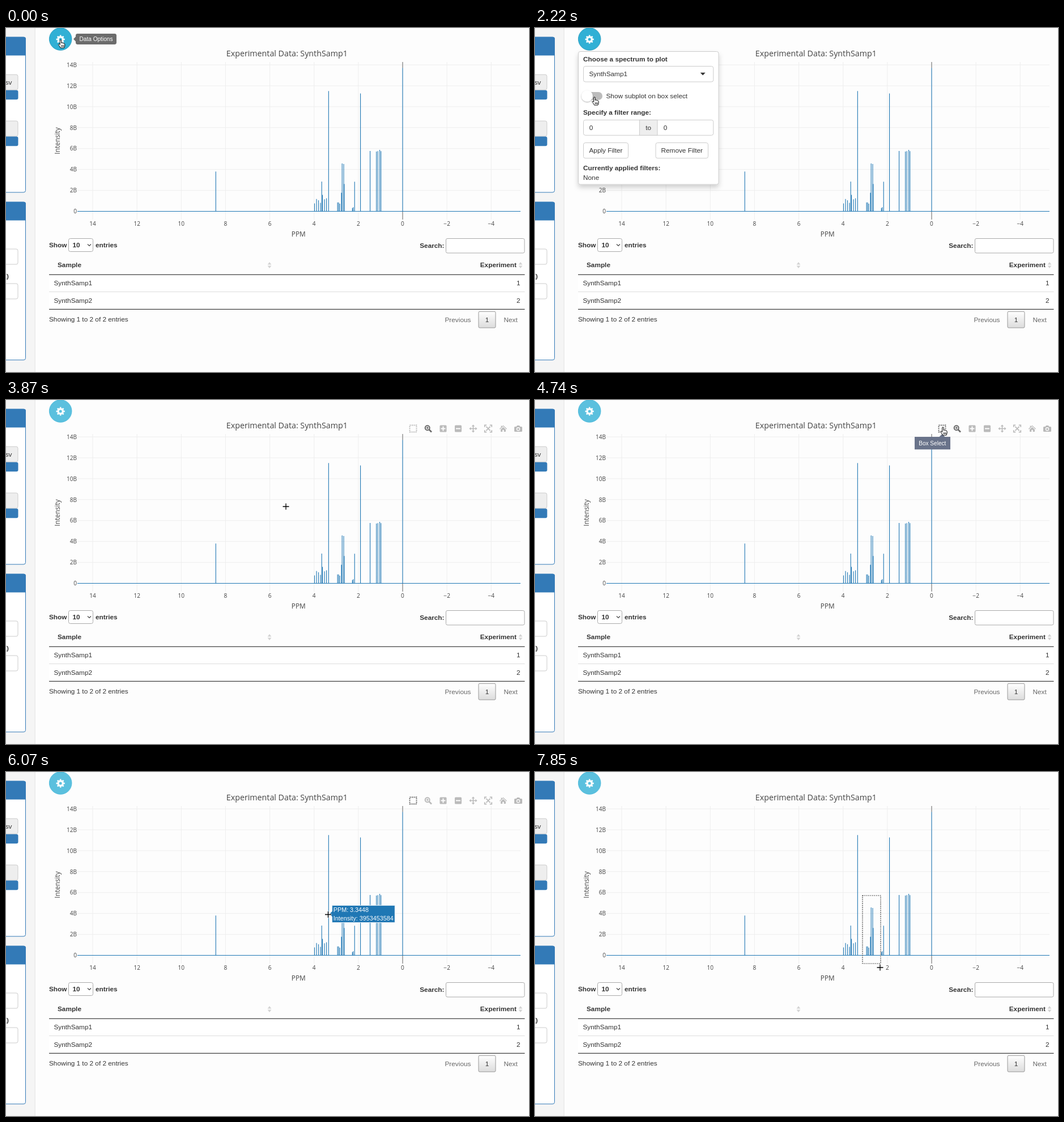
An HTML page for the animation above (8 s loop, 923 by 607 pixels).

```html
<!DOCTYPE html>
<html lang="en">
<head>
<meta charset="utf-8">
<title>Spectrum viewer</title>
<style>
  html, body { margin: 0; width: 100%; height: 100%; overflow: hidden; background: #fdfdfd; }
  svg { display: block; width: 923px; height: 607px; }
  text { font: 11.8px "Liberation Sans", Arial, sans-serif; fill: #333; white-space: pre; }
  .b { font-weight: 700; }
  .mid { text-anchor: middle; }
  .end { text-anchor: end; }
  .plot text { font-family: "Open Sans", sans-serif; fill: #444; }
  .plot .tick { font-size: 10.1px; }
  .plot .title { font-size: 14.25px; }
  .tip { font-size: 10.1px; fill: #fff; }
  .hov { font-size: 10.75px; fill: #fff; }
  .box { fill: #fff; stroke: #ccc; }
  .fill { fill: #337ab7; }
  .icon { fill: #444; stroke: #444; stroke-width: 0; }
  .line { fill: none; stroke-width: 1.8; }
</style>
</head>
<body>
<svg id="stage" viewBox="0 0 923 607" xmlns="http://www.w3.org/2000/svg">
  <defs>
    <linearGradient id="btn" x2="0" y2="1"><stop stop-color="#fff"/><stop offset="1" stop-color="#dcdcdc"/></linearGradient>
    <filter id="soft" x="-20%" y="-20%" width="140%" height="150%"><feDropShadow dx="0" dy="5" stdDeviation="4" flood-opacity=".18"/></filter>
    <filter id="lift" x="-40%" y="-40%" width="180%" height="180%"><feDropShadow dx="0" dy="1" stdDeviation="1" flood-opacity=".35"/></filter>
    <path id="sort" d="M0-5.5L3.4-.9H-3.4ZM0 5.5L3.4 .9H-3.4Z" fill="#d3d3d3"/>
  </defs>

  <g id="sidebar">
    <rect x="-5" y="-5" width="56.2" height="620" fill="#f5f5f5" stroke="#e3e3e3"/>
    <rect class="box" x="-9" y="16.2" width="43.5" height="273.8" rx="3.4" style="stroke:#337ab7"/>
    <path class="fill" d="M0 15.8H31.5Q35 15.8 35 19.3V48.5H0Z"/>
    <rect class="box" x="-9" y="82.2" width="30" height="27" rx="3" style="fill:#eee"/>
    <text class="end" x="10.5" y="100">data.csv</text>
    <rect class="fill" x="-9" y="109.7" width="30.5" height="16.6" rx="3"/>
    <rect class="box" x="-9" y="164" width="30" height="27" rx="3" style="fill:#eee"/>
    <rect class="fill" x="-9" y="191.5" width="30.5" height="16.8" rx="3"/>
    <rect class="box" x="-9" y="307.2" width="43.5" height="278.6" rx="3.4" style="stroke:#337ab7"/>
    <path class="fill" d="M0 306.8H31.5Q35 306.8 35 310.3V339.5H0Z"/>
    <rect class="box" x="-9" y="390" width="30" height="27" rx="3"/>
    <text class="b end" x="5" y="442">(K)</text>
    <rect class="box" x="-9" y="451" width="30" height="27" rx="3"/>
  </g>

  <g id="plot" class="plot"></g>

  <g id="table">
    <text class="b" x="76" y="387">Show</text>
    <rect class="box" x="110.5" y="371.5" width="43" height="23" rx="3" style="stroke:#aaa"/>
    <text class="b" x="117.5" y="387">10</text>
    <path d="M144 381.5L147 384.5L150 381.5" fill="none" stroke="#444" stroke-width="1.2"/>
    <text class="b" x="158" y="387">entries</text>
    <text class="b end" x="773.5" y="388">Search:</text>
    <rect class="box" x="776.5" y="371.5" width="138.5" height="25.5" rx="2.5" style="stroke:#aaa"/>
    <text class="b" x="91" y="422.3">Sample</text>
    <text class="b end" x="901" y="422.3">Experiment</text>
    <use href="#sort" x="465" y="418.5"/><use href="#sort" x="908" y="418.5"/>
    <rect x="76" y="435" width="839.5" height="61" fill="#fff"/>
    <path d="M76 465.5H915.5" stroke="#ddd"/>
    <path d="M76 435.2H915.5M76 496.3H915.5" stroke="#111"/>
    <text x="84.5" y="454.3">SynthSamp1</text><text class="end" x="907.5" y="454.3">1</text>
    <text x="84.5" y="485.2">SynthSamp2</text><text class="end" x="907.5" y="485.2">2</text>
    <text x="76" y="518">Showing 1 to 2 of 2 entries</text>
    <text x="774.5" y="519" style="fill:#666">Previous</text>
    <rect x="834" y="500.3" width="30" height="28.7" rx="2" fill="url(#btn)" stroke="#979797"/>
    <text class="mid" x="849" y="519">1</text>
    <text x="878.5" y="519" style="fill:#666">Next</text>
  </g>

  <g id="modebar"></g>
  <g id="barTip">
    <path d="M670 65H713.5L718.5 60L723.5 65H733V87.3H670Z" fill="#69738a"/>
    <text class="tip mid" x="701.3" y="79.7">Box Select</text>
  </g>

  <g id="select" fill="none">
    <path id="selBack" stroke="#fff"/>
    <path id="selDots" stroke="#222" stroke-width="1.2" stroke-dasharray="1.7 1.7"/>
  </g>

  <g id="hover">
    <path d="M1.5 0L6 -4.8V-15.2H117V15.2H6V4.8Z" fill="#1f77b4" stroke="#fff" stroke-width=".9"/>
    <text id="ppm" class="hov" x="8.5" y="-3.2"></text>
    <text id="inten" class="hov" x="8.5" y="11"></text>
  </g>

  <g id="gear">
    <circle id="gearBg" cx="96.2" cy="19.5" r="19.8" stroke-width=".85"/>
    <g fill="none" stroke="#fff" transform="translate(96.2 20)">
      <circle r="4.2" stroke-width="3.4"/>
      <circle r="6.4" stroke-width="2.4" pathLength="16" stroke-dasharray="1 1" stroke-dashoffset=".5"/>
    </g>
  </g>
  <g id="gearTip">
    <path d="M119 19.5L123 15.3V23.7Z" fill="#6c6c6c"/>
    <rect x="123" y="10" width="72" height="19" rx="3.4" fill="#6c6c6c"/>
    <text class="tip mid" x="159" y="23.3">Data Options</text>
  </g>

  <g id="panel">
    <rect x="76.5" y="41.5" width="247.5" height="234.5" rx="3.4" fill="#fff" stroke="#ccc" filter="url(#soft)"/>
    <text class="b" x="85" y="59">Choose a spectrum to plot</text>
    <rect class="box" x="85.5" y="67.5" width="229.3" height="27.5" rx="3.4"/>
    <text x="95.5" y="85">SynthSamp1</text>
    <path d="M291.7 78.8H300.7L296.2 83.4Z" fill="#333"/>
    <rect id="track" x="85" y="113" width="34" height="14" rx="7"/>
    <circle id="knob" cy="120" r="10" filter="url(#lift)"/>
    <text x="125.5" y="124.2">Show subplot on box select</text>
    <text class="b" x="85" y="153.3">Specify a filter range:</text>
    <rect class="box" x="85.5" y="162.3" width="229.3" height="27" rx="3.4"/>
    <rect class="box" x="184.5" y="162.3" width="31.5" height="27" style="fill:#eee"/>
    <text x="95.7" y="180">0</text><text class="mid" x="200.2" y="180">to</text><text x="226.7" y="180">0</text>
    <rect class="box" x="85.5" y="202.5" width="79" height="27.3" rx="3.4"/>
    <text class="mid" x="125" y="220.3">Apply Filter</text>
    <rect class="box" x="213" y="202.5" width="92.5" height="27.3" rx="3.4"/>
    <text class="mid" x="259.2" y="220.3">Remove Filter</text>
    <text class="b" x="85" y="251">Currently applied filters:</text>
    <text x="85" y="267.6">None</text>
  </g>

  <path id="hand" fill="#fff" stroke="#000" stroke-linejoin="round"
    d="M-1.3 1C-1.3-.5 1.1-.5 1.2 1L1.3 5.5C1.4 4.5 3.2 4.5 3.4 5.8C3.7 5 5.3 5.2 5.5 6.5C6 6 7.2 6.3 7.2 7.6V10C7 11.5 6.4 12.5 6 14H-.5C-1.5 11.5-3 10-4 8.5C-4.4 7.3-3 6.7-2 7.6L-1.3 8.5ZM1.3 9.5V12M3.2 9.5V12M5 9.5V12"/>
  <g id="cross">
    <path d="M-6 0H6M0-6V6" stroke="#fff" stroke-width="2.8" opacity=".8"/>
    <path d="M-5.5 0H5.5M0-5.5V5.5" stroke="#000" stroke-width="1.3"/>
  </g>
</svg>

<script>
const $ = id => document.getElementById(id);
const LOOP = 8000, STEP = 148;  // the screen refreshes once per STEP
const ZERO_X = 700, BASE_Y = 323.5, PPM_PX = 39.07, B_PX = 18.46;
const AREA = { left: 126, right: 908, top: 60, bottom: 338 };
const px = ppm => ZERO_X - ppm * PPM_PX;
const py = billions => BASE_Y - billions * B_PX;

const clamp = v => Math.max(0, Math.min(1, v));
const mix = (a, b, k) => a + (b - a) * k;

// Main signals [ppm, billions] and groups of small ones [from, to, count, tallest]
const TALL = 3.3445, PAIR = 2.7335;
const signals = [[8.44, 3.8], [3.655, 2.85], [TALL, 11.5], [PAIR, 4.58], [2.662, 4.53], [2.17, 2.83],
  [1.905, 11.27], [1.47, 5.77], [1.185, 5.72], [1.12, 5.75], [1.035, 5.88], [.98, 5.75], [0, 13.7]];
const groups = [[3.98, 3.44, 7, 1.7], [2.94, 2.84, 3, 1.2], [2.765, 2.64, 2, 3.1], [2.27, 2.23, 2, .6]];

function seeded(seed) {
  return () => (seed = seed * 16807 % 2147483647) / 2147483647;
}

function drawPlot() {
  const rnd = seeded(11), peak = (ppm, b) => `M${px(ppm)} ${BASE_Y}V${py(b)}`;
  let grid = '', labels = '', lines = '';
  for (let v = 14; v >= -4; v -= 2) {
    grid += `M${px(v)} ${AREA.top}V${AREA.bottom}`;
    labels += `<text class="tick mid" x="${px(v)}" y="349">${String(v).replace('-', '\u2212')}</text>`;
  }
  for (let v = 0; v <= 14; v += 2) {
    grid += `M${AREA.left} ${py(v)}H${AREA.right}`;
    labels += `<text class="tick end" x="125" y="${py(v) + 3.7}">${v ? v + 'B' : 0}</text>`;
  }
  for (const [ppm, b] of signals) lines += peak(ppm, b);
  for (const [from, to, n, max] of groups)
    for (let i = 0; i < n; i++) lines += peak(mix(from, to, i / (n - 1)), max * mix(.45, 1, rnd()));
  $('plot').innerHTML = `
    <path d="${grid}" stroke="#eee"/>
    <path d="M${ZERO_X} ${AREA.top}V${py(13.7)}M${ZERO_X} ${BASE_Y}V${AREA.bottom}" stroke="#666"/>
    <path d="M${AREA.left} ${BASE_Y}H${AREA.right}${lines}" fill="none" stroke="#1f77b4" stroke-width="1.1"/>
    ${labels}
    <text class="title mid" x="495.8" y="50">Experimental Data: SynthSamp1</text>
    <text class="mid" x="516.3" y="368">PPM</text>
    <text class="mid" transform="translate(95 199) rotate(-90)">Intensity</text>`;
}

const square = 'M-4.5-6H4.5Q6-6 6-4.5V4.5Q6 6 4.5 6H-4.5Q-6 6-6 4.5V-4.5Q-6-6-4.5-6Z';
const icons = [
  '<rect class="line" x="-6" y="-6" width="12" height="12" stroke-dasharray="2 1.43"/>',
  '<g class="line"><circle cx="-1.3" cy="-1.3" r="4" stroke-width="2"/><path d="M1.8 1.8L6 6" stroke-width="2.6"/><path d="M-3.3-1.3H.7M-1.3-3.3V.7" stroke-width="1.4"/></g>',
  `<path fill-rule="evenodd" d="${square}M-1-4H1V-1H4V1H1V4H-1V1H-4V-1H-1Z"/>`,
  `<path fill-rule="evenodd" d="${square}M-4-1H4V1H-4Z"/>`,
  '<path d="M0-7L2.8-4H.8V-.8H4V-2.8L7 0L4 2.8V.8H.8V4H2.8L0 7L-2.8 4H-.8V.8H-4V2.8L-7 0L-4-2.8V-.8H-.8V-4H-2.8Z"/>',
  '<path class="line" d="M-6.2-2.8V-6.2H-2.8M2.8-6.2H6.2V-2.8M6.2 2.8V6.2H2.8M-2.8 6.2H-6.2V2.8M-3.6-3.6L3.6 3.6M3.6-3.6L-3.6 3.6"/>',
  '<path d="M0-5.8L6.5 .3L5.7 1.2L0-4.2L-5.7 1.2L-6.5 .3L-3.8-2.2V-5H-2.2V-3.7ZM0-2.8L4.4 1.4V5.5H1.3V2.2H-1.3V5.5H-4.4V1.4Z"/>',
  '<path fill-rule="evenodd" d="M-5.5-3.6H-3.3L-2-5.5H2L3.3-3.6H5.5Q7-3.6 7-2.1V4Q7 5.5 5.5 5.5H-5.5Q-7 5.5-7 4V-2.1Q-7-3.6-5.5-3.6ZM-3.2 .8A3.2 3.2 0 1 0 3.2 .8A3.2 3.2 0 1 0-3.2 .8Z"/><circle cy=".8" r="1.9"/>'
];

function drawModebar() {
  $('modebar').innerHTML = icons.map((art, i) =>
    `<g class="icon" opacity=".36" transform="translate(${718.5 + i * 26.5} 50.5)">${art}</g>`).join('');
}

// Key moments, in refreshes
const AT = { open: 4, toggle: 15, close: 23, overBox: 31, boxMode: 33, hover: 37, rest: 45, drag: 47 };

// Pointer moves: [start, end, x, y]; it waits in between
const moves = [
  [2, 7, 144.5, 87], [9, 13, 105, 122], [17, 22, 381, 258], [23, 32, 720, 48],
  [33, AT.hover, 560, 282], [AT.hover, AT.rest, 577, 221], [46, 52, 608, 359], [52, 53, 609, 345]
];
const along = n => clamp((n - AT.hover) / (AT.rest - AT.hover));

function pointer(n) {
  let x = 96.5, y = 21;
  for (const [a, b, toX, toY] of moves) {
    const k = clamp((n - a) / (b - a));
    x = mix(x, toX, k);
    y = mix(y, toY, k);
  }
  // Sways while following the tall signal
  return [x - 16 * Math.sin(along(n) * 2 * Math.PI), y];
}

const show = (id, on) => $(id).setAttribute('visibility', on ? 'visible' : 'hidden');
const move = (id, x, y) => $(id).setAttribute('transform', `translate(${x} ${y})`);
const set = (id, props) => { for (const k in props) $(id).setAttribute(k, props[k]); };

function drawHover(n, x) {
  const k = along(n);
  const near = Math.abs(x - px(PAIR)) < Math.abs(x - px(TALL)) ? PAIR : TALL;
  const inten = Math.round(mix(2417940160, 5488967008, k));
  show('hover', n >= AT.hover && n < AT.drag);
  move('hover', px(near), py(inten / 1e9));
  $('ppm').textContent = 'PPM: ' + (near + .0006 * k).toFixed(4);
  $('inten').textContent = 'Intensity: ' + inten;
}

function drawSelection(n, x, y) {
  const x0 = 578, y0 = 218, bottom = Math.min(y, AREA.bottom);
  // A nearly vertical drag selects the full width
  const [l, r] = x - x0 < 10 ? [AREA.left, AREA.right] : [x0, x + 1];
  const d = `M${l} ${y0}H${r}V${bottom}H${l}Z`;
  show('select', n >= AT.drag);
  set('selBack', { d });
  set('selDots', { d });
}

function render(time) {
  const n = Math.floor(time / STEP), [x, y] = pointer(n);

  const [fill, stroke] = n < 3 ? ['#31b0d5', '#269abc'] : n < AT.toggle ? ['#269abc', '#1b6d85']
    : n < AT.close ? ['#31b0d5', '#269abc'] : ['#5bc0de', '#46b8da'];
  set('gearBg', { fill, stroke });
  show('gearTip', n < 1);

  const on = n > AT.toggle;
  show('panel', n >= AT.open && n < AT.close);
  set('track', { fill: on ? '#94b7d7' : '#bcbcbc' });
  set('knob', { cx: on ? 112 : 92, fill: on ? '#337ab7' : '#fff' });

  const over = n >= AT.overBox && n <= AT.boxMode, boxMode = n >= AT.boxMode;
  const [boxIcon, zoomIcon] = $('modebar').children;
  show('modebar', n >= AT.close && n < AT.drag);
  set('modebar', { opacity: clamp((n - AT.close + 1) / 3) });
  boxIcon.setAttribute('opacity', over || boxMode ? .8 : .36);
  zoomIcon.setAttribute('opacity', boxMode ? .36 : .8);
  show('barTip', over);

  drawHover(n, x);
  drawSelection(n, x, y);

  const hand = n < 20 || over;
  show('hand', hand);
  show('cross', !hand);
  move(hand ? 'hand' : 'cross', x, y);
}

drawPlot();
drawModebar();
const start = performance.now();
function loop() {
  render((performance.now() - start) % LOOP);
  requestAnimationFrame(loop);
}
loop();
</script>
</body>
</html>
```
